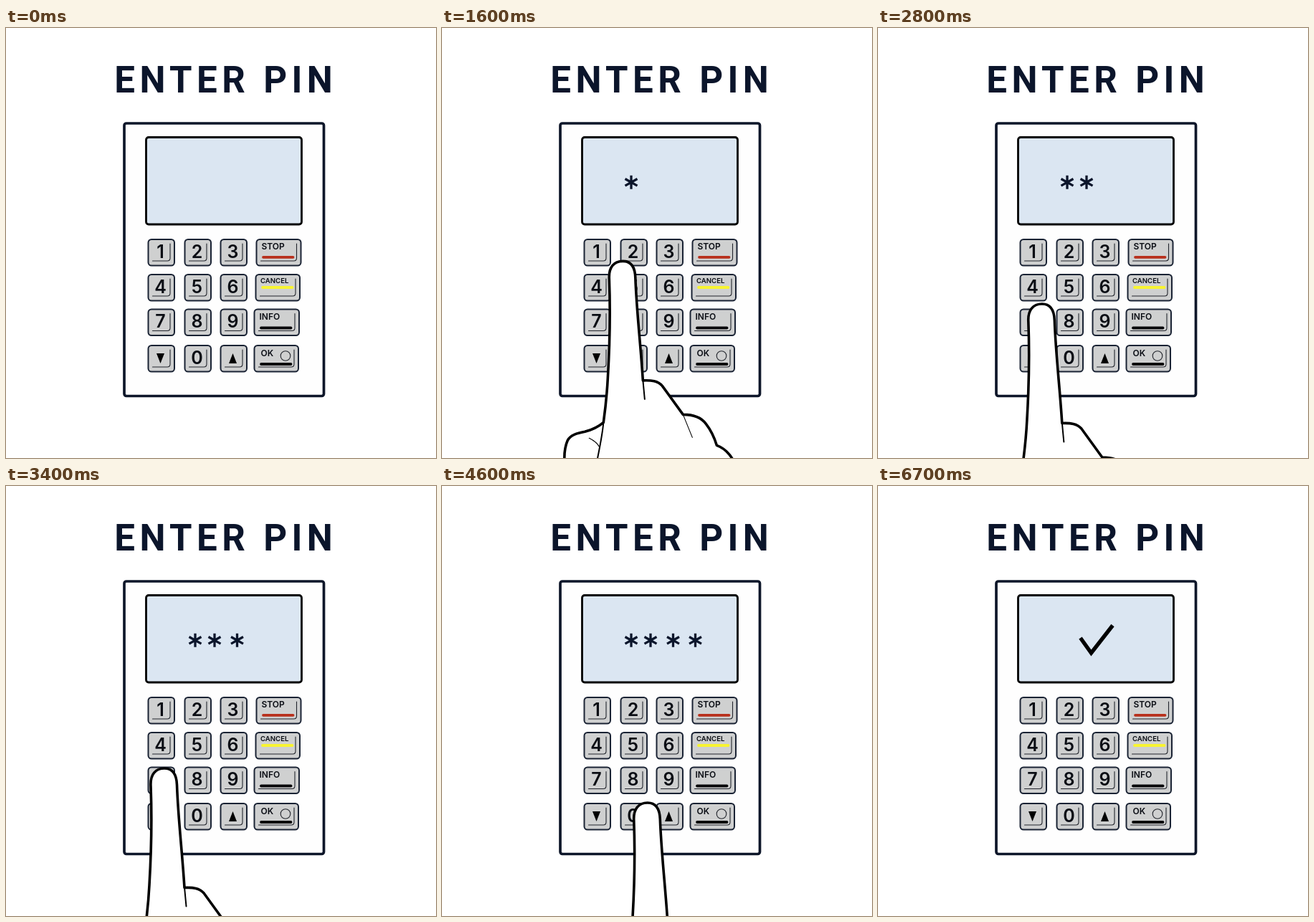
An HTML page for the animation above (6.8 s loop, 600 by 600 pixels).

```html
<!DOCTYPE html>
<html lang="en">
<head>
<meta charset="utf-8">
<title>Enter PIN</title>
<style>
  html, body { margin: 0; width: 100%; height: 100%; overflow: hidden; background: #fff; }
  svg { display: block; width: 100vw; height: 100vh; }
  .title { font: 700 51px Roboto, Inter, sans-serif; letter-spacing: 6.4px; fill: #0b152b; }
  .digit { font: 600 25px Inter, Roboto, sans-serif; text-anchor: middle; fill: #0a0d14; }
  .label { font-family: Inter, Roboto, sans-serif; font-weight: 600; fill: #0a0d14; }
  .key { fill: #cfd0d0; stroke: #1a2334; stroke-width: 2; }
  .thin { fill: none; stroke: #22252c; stroke-width: 1.1; stroke-linecap: round; }
  .bar { stroke-width: 3.8; stroke-linecap: round; }
  .skin { fill: #fff; stroke: #000; stroke-width: 3.6; stroke-linejoin: round; }
  .crease { fill: none; stroke: #000; stroke-width: 2; stroke-linecap: round; }
  .star { fill: none; stroke: #0b152b; stroke-width: 3.3; }
</style>
</head>
<body>
<svg viewBox="0 0 600 600" xmlns="http://www.w3.org/2000/svg">
  <rect width="600" height="600" fill="#fff"/>
  <text class="title" x="151.300" y="90">ENTER PIN</text>
  <rect x="165" y="133" width="278.5" height="380.5" rx="3" fill="#fefefe" stroke="#0d1629" stroke-width="3.7"/>
  <rect x="195.5" y="152.5" width="217" height="121.5" rx="3.5" fill="#dbe6f2" stroke="#000" stroke-width="2.8"/>
  <g id="stars"></g>
  <path id="check" d="M282.5 212 L297.5 233 L327.5 194.5" fill="none" stroke="#000" stroke-width="5.4"/>
  <g id="keys"></g>
  <g id="hand">
    <path class="skin" d="M150 650 C150 622 147 610 144 600 C139 585 137 563 144 547
      C148 539 158 537 168 535 C179 532 187 528 194 522
      C197 500 199 480 200 460 C203 410 204 375 202 322
      C201 305 209 297 221 297 C233 297 238 306 238.500 320
      C240 365 246 415 249 463.500 C261 463 270 464 276 471 L305 511
      C316 511 329 513 337 524 C344 533 349 544 352 554
      C366 559 377 573 379 588 C380 596 381 610 383 650 Z"/>
    <path class="crease" d="M249 463 L251.500 489.500 M194 522 C192 545 186 568 181 597"/>
    <path class="crease" style="stroke-width:1.1" d="M305 511 L318 543 M174 544 C180 547 185 550 188 556"/>
  </g>
</svg>
<script>
const LOOP = 6800, STEP = 100;
const el = id => document.getElementById(id);

// Keypad
const rows = [295, 344, 392.5, 443], cols = [198.5, 249.5, 299.5];
const digits = ["123", "456", "789", "v0^"];

function keyBody(x, y, w) {
  const r = x + w - 6, b = y + 30;
  return `<rect class="key" x="${x}" y="${y}" width="${w}" height="36.5" rx="4.5"/>
    <path class="thin" d="M${r} ${y + 6} V${b - 4} Q${r} ${b} ${r - 4} ${b} H${x + 6}"/>`;
}

function numberKey(x, y, char) {
  const cx = x + 17, top = y + 11, low = y + 25;
  const arrow = (base, tip) => `<path d="M${cx - 5.5} ${base} H${cx + 5.5} L${cx} ${tip} Z" fill="#000"/>`;
  const face = char === "v" ? arrow(top, low)
    : char === "^" ? arrow(low, top)
    : `<text class="digit" x="${cx}" y="${y + 25.7}">${char}</text>`;
  return keyBody(x, y, 36.5) + face;
}

function wideKey({ text, x, w, tx, ty, size, color, barY }, row) {
  const y = rows[row];
  return keyBody(x, y, w) +
    `<text class="label" x="${tx}" y="${ty}" font-size="${size}">${text}</text>
     <path class="bar" stroke="${color}" d="M${x + 9.5} ${barY} H${x + 51}"/>`;
}

const wideKeys = [
  { text: "STOP", x: 349.5, w: 62, tx: 356.5, ty: 309, size: 12, color: "#b8301c", barY: 319.8 },
  { text: "CANCEL", x: 348.5, w: 61.5, tx: 355, ty: 356, size: 9.6, color: "#f8f430", barY: 362 },
  { text: "INFO", x: 346.5, w: 62.5, tx: 353.5, ty: 406.7, size: 12, color: "#0a0a0c", barY: 418.5 },
  { text: "OK", x: 346.5, w: 61.5, tx: 355.5, ty: 457.6, size: 12, color: "#0a0a0c", barY: 469 }
];

el("keys").innerHTML =
  rows.map((y, r) => cols.map((x, c) => numberKey(x, y, digits[r][c])).join("")).join("") +
  wideKeys.map(wideKey).join("") +
  `<circle class="thin" cx="390" cy="457.500" r="6.800"/>`;

// Masked digits
const stars = [[264, 900], [291, 2000], [322.5, 3100], [353.5, 4100]];
el("stars").innerHTML = stars.map(([x]) =>
  `<path class="star" transform="translate(${x} 215.300)" d="M0 -9.500 V9.500 M-8.500 -4.800 L8.500 4.800 M-8.500 4.800 L8.500 -4.800"/>`
).join("");
const starNodes = [...el("stars").children];
const CLEAR = 5800;

// Hand offsets from the "1" key: time, x, y
const route = [
  [100, 0, 310], [700, 0, -1], [1200, 0, -1], [1800, 47, 43], [2300, 47, 43],
  [2900, 0, 97], [3400, 0, 97], [3900, 43, 145], [4500, 43, 145],
  [5000, 157, 145], [5600, 157, 145], [6200, 157, 310]
];

function handAt(t) {
  const i = route.findIndex(p => p[0] > t);
  if (i < 1) return route[i < 0 ? route.length - 1 : 0].slice(1);
  const [t0, x0, y0] = route[i - 1], [t1, x1, y1] = route[i];
  const k = (t - t0) / (t1 - t0);
  return [x0 + (x1 - x0) * k, y0 + (y1 - y0) * k];
}

const show = (node, on) => node.setAttribute("visibility", on ? "visible" : "hidden");

function draw(t) {
  const [x, y] = handAt(t);
  el("hand").setAttribute("transform", `translate(${x} ${y})`);
  stars.forEach(([, at], i) => show(starNodes[i], t >= at && t < CLEAR));
  show(el("check"), t >= CLEAR);
}

let start;
function tick(now) {
  start ??= now;
  draw(Math.floor(((now - start) % LOOP) / STEP) * STEP);
  requestAnimationFrame(tick);
}
draw(0);
requestAnimationFrame(tick);
</script>
</body>
</html>
```
